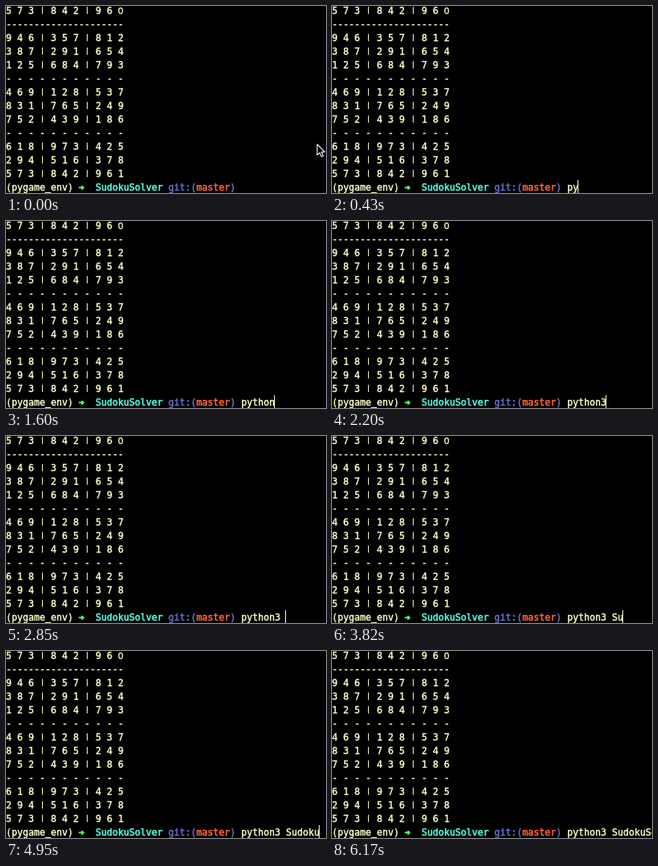
Write an HTML page that moves like this. It is 400 px wide and 234 px high and loops after 8000 ms.

```html
<!DOCTYPE html>
<html lang="en">
<head>
<meta charset="utf-8">
<title>Terminal</title>
<style>
  html, body { margin: 0; width: 100%; height: 100%; overflow: hidden; background: #000; }
  .term {
    position: absolute; left: 0; top: -2px; width: 400px; height: 238px; overflow: hidden;
    font: 11.63px/17px "DejaVu Sans Mono", "Liberation Mono", monospace;
    color: #ffffc8; white-space: pre; -webkit-text-stroke: 0.4px;
  }
  .grid { height: 221px; }
  .grid i {
    display: inline-block; font-style: normal; -webkit-text-stroke: 0;
    transform: translateY(-1px) scaleY(0.72);
  }
  .zero { font-family: "Open Sans", sans-serif; line-height: 0; }
  .prompt { position: absolute; left: 0; top: 221px; height: 17px; }
  .prompt b { font-weight: 400; -webkit-text-stroke-width: 0.55px; }
  .prompt .arrow {
    display: inline-block; width: 7px; height: 17px; color: #4dff62; vertical-align: top;
    -webkit-text-stroke-width: 0.9px;
  }
  .dir { color: #55ffe4; }
  .git { color: #666bc8; }
  .branch { color: #ff6238; }
  .typed {
    position: absolute; left: 294px; top: 221px; height: 17px; width: 0; overflow: hidden;
    animation: type 8s step-end infinite;
  }
  .caret {
    position: absolute; left: 293px; top: 220px; width: 1px; height: 16px; background: #ffffc8;
    animation: move 8s step-end infinite;
  }
  .mouse {
    position: absolute; left: 388px; top: 172px;
    animation: hide 8s step-end infinite;
  }
  /* one character is 7px wide */
  @keyframes type {
    0% { width: 0; }
    0.5% { width: 7px; }
    4% { width: 14px; }
    9.125% { width: 21px; }
    13% { width: 28px; }
    16.5% { width: 35px; }
    20% { width: 42px; }
    26.875% { width: 49px; }
    35.625% { width: 56px; }
    43.625% { width: 63px; }
    47.75% { width: 70px; }
    49.75% { width: 77px; }
    53% { width: 84px; }
    59.625% { width: 91px; }
    61.5% { width: 98px; }
    74.875% { width: 105px; }
    77.125%, 100% { width: 112px; }
  }
  @keyframes move {
    0% { transform: translateX(0); opacity: 0; }
    0.5% { transform: translateX(7px); opacity: 1; }
    4% { transform: translateX(14px); opacity: 1; }
    9.125% { transform: translateX(21px); opacity: 1; }
    13% { transform: translateX(28px); opacity: 1; }
    16.5% { transform: translateX(35px); opacity: 1; }
    20% { transform: translateX(42px); opacity: 1; }
    26.875% { transform: translateX(49px); opacity: 1; }
    35.625% { transform: translateX(56px); opacity: 1; }
    43.625% { transform: translateX(63px); opacity: 1; }
    47.75% { transform: translateX(70px); opacity: 1; }
    49.75% { transform: translateX(77px); opacity: 1; }
    53% { transform: translateX(84px); opacity: 1; }
    59.625% { transform: translateX(91px); opacity: 1; }
    61.5% { transform: translateX(98px); opacity: 1; }
    74.875% { transform: translateX(105px); opacity: 1; }
    77.125%, 100% { transform: translateX(112px); opacity: 1; }
  }
  @keyframes hide {
    0% { visibility: visible; }
    0.5%, 100% { visibility: hidden; }
  }
</style>
</head>
<body>
<div class="term"><div class="grid">5 7 3 | 8 4 2 | 9 6 <span class="zero">0</span>
---------------------
9 4 6 | 3 5 7 | 8 1 2
3 8 7 | 2 9 1 | 6 5 4
1 2 5 | 6 8 4 | 7 9 3
- - - - - - - - - - -
4 6 9 | 1 2 8 | 5 3 7
8 3 1 | 7 6 5 | 2 4 9
7 5 2 | 4 3 9 | 1 8 6
- - - - - - - - - - -
6 1 8 | 9 7 3 | 4 2 5
2 9 4 | 5 1 6 | 3 7 8
5 7 3 | 8 4 2 | 9 6 1</div><div class="prompt">(pygame_env) <b class="arrow">➜</b>  <b class="dir">SudokuSolver</b> <b class="git">git:(</b><b class="branch">master</b><b class="git">)</b></div><div class="typed">python3 SudokuSo</div><div class="caret"></div></div>
<svg class="mouse" width="12" height="19" viewBox="0 0 12 19">
  <path d="M1 1V14.5L4.2 11.6L6.3 16.6L8.5 15.6L6.4 10.8H10.6Z" fill="#000" stroke="#fff" stroke-width="1.1" stroke-linejoin="round"/>
</svg>
<script>
  // bars are as tall as the digits
  const grid = document.querySelector(".grid");
  grid.innerHTML = grid.innerHTML.replace(/\|/g, "<i>|</i>");
</script>
</body>
</html>
```
